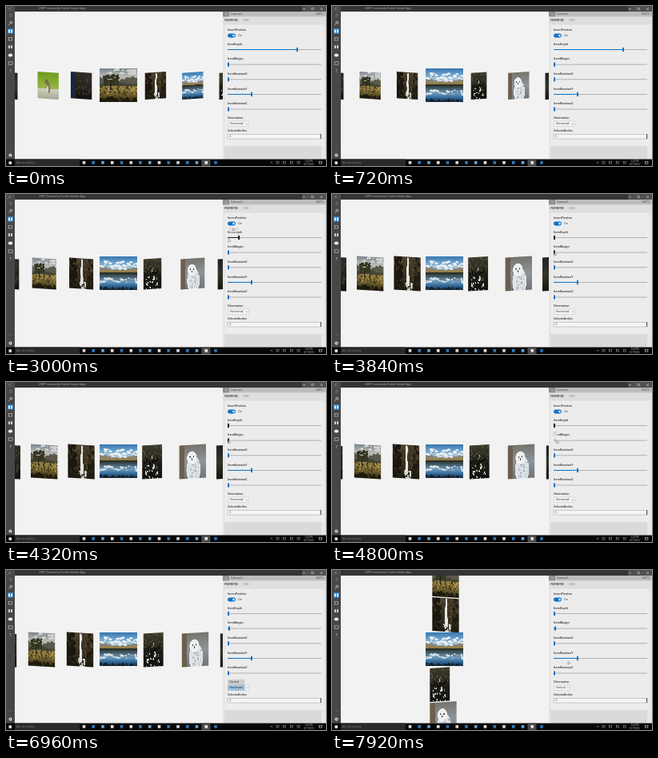
An HTML page with a canvas for the animation above (8 s loop, 400 by 200 pixels).

```html
<!DOCTYPE html>
<html lang="en">
<head>
<meta charset="utf-8">
<title>Carousel sample</title>
<style>
html, body { margin: 0; width: 100%; height: 100%; overflow: hidden; background: #f2f2f2; }
canvas { display: block; width: 400px; height: 200px; }
</style>
</head>
<body>
<canvas id="stage"></canvas>
<script>
const LOOP = 8000;
const BLUE = '#0f73c6';
const FONT = '"Open Sans", "Noto Sans", sans-serif';
const canvas = document.getElementById('stage');
const ratio = window.devicePixelRatio || 1;
canvas.width = 400 * ratio;
canvas.height = 200 * ratio;
const ctx = canvas.getContext('2d');

const clamp = v => Math.max(0, Math.min(1, v));
const mix = (a, b, p) => a + (b - a) * p;
function ease(t, from, to) {
  const p = clamp((t - from) / (to - from));
  return p * p * (3 - 2 * p);
}

function rect(x, y, w, h, color, c = ctx) {
  c.fillStyle = color;
  c.fillRect(x, y, w, h);
}
function frame(x, y, w, h, color, width = 0.6) {
  ctx.strokeStyle = color;
  ctx.lineWidth = width;
  ctx.strokeRect(x, y, w, h);
}
function disc(x, y, r, color, c = ctx, ry = r) {
  c.fillStyle = color;
  c.beginPath();
  c.ellipse(x, y, r, ry, 0, 0, 7);
  c.fill();
}
function pill(x, y, w, h, color) {
  ctx.fillStyle = color;
  ctx.beginPath();
  ctx.roundRect(x, y, w, h, Math.min(w, h) / 2);
  ctx.fill();
}
function line(x0, y0, x1, y1, color, width = 0.6) {
  ctx.strokeStyle = color;
  ctx.lineWidth = width;
  ctx.beginPath();
  ctx.moveTo(x0, y0);
  ctx.lineTo(x1, y1);
  ctx.stroke();
}
// Arrow head: (dx, dy) points from the tip along one arm.
function chevron(x, y, dx, dy, color, side = false) {
  line(x, y, x + dx, y + dy, color);
  line(x, y, side ? x + dx : x - dx, side ? y - dy : y + dy, color);
}
function text(str, x, y, size, color, weight = 400, align = 'left') {
  ctx.font = `${weight} ${size}px ${FONT}`;
  ctx.textAlign = align;
  ctx.textBaseline = 'middle';
  ctx.fillStyle = color;
  ctx.fillText(str, x, y);
}

// ---- pictures, painted once in a 47 x 42 space ----
const W = 47, H = 42;
function random(seed) {
  return () => (seed = (seed * 16807) % 2147483647) / 2147483647;
}
// Soft blotches inside a box between two heights.
function specks(c, n, x0, x1, y0, y1, color, r = 1.2, flat = 1) {
  const rnd = random(n * 97 + Math.round(x0 + y0 * 13) + 5);
  for (let i = 0; i < n; i++) {
    const size = r * (0.4 + rnd());
    disc(mix(x0, x1, rnd()), mix(y0, y1, rnd()), size, color, c, size * flat);
  }
}
function fade(c, y, h, ...colors) {
  const g = c.createLinearGradient(0, y, 0, y + h);
  colors.forEach((col, i) => g.addColorStop(i / (colors.length - 1), col));
  rect(0, y, W, h, g, c);
}
// Rolling land from a wavy crest down to the base line.
function hills(c, y, amp, base, color, phase = 0) {
  c.fillStyle = color;
  c.beginPath();
  c.moveTo(0, base);
  for (let x = 0; x <= W; x++) {
    c.lineTo(x, y - amp * (Math.sin(x / 7 + phase) + 0.35 * Math.sin(x * 0.9 + phase)));
  }
  c.lineTo(W, base);
  c.fill();
}
// Falling water: a wandering band that widens with depth.
function stream(c, x, y0, y1, w0, w1, sway, color) {
  for (let y = y0; y < y1; y += 0.25) {
    const p = (y - y0) / (y1 - y0), w = mix(w0, w1, p * p);
    rect(x + sway * Math.sin(y / 3.5) - w / 2, y, w, 0.4, color, c);
  }
}
function picture(w, paint, dx = 0) {
  const img = document.createElement('canvas');
  img.width = w * 4;
  img.height = H * 4;
  const c = img.getContext('2d');
  c.scale(4, 4);
  paint(c);
  return { img, w, dx };
}

const dusk = picture(W, c => fade(c, 0, H, '#1d2226', '#34342c', '#15140f'));
const squirrel = picture(W, c => {
  fade(c, 0, H, '#6f9c1e', '#8fb23c', '#b9c48e');
  fade(c, 26, 16, '#cdd1bf', '#a9a795');
  disc(24, 24, 4.5, '#8d7a63', c, 9);
  disc(20, 15, 4, '#7c6a55', c);
  disc(22, 27, 2.5, '#d6cfc2', c, 5);
}, 5);
const night = picture(W, c => {
  fade(c, 0, H, '#2d2b28', '#26231d', '#14120e');
  rect(0, 0, 11, H, '#18263f', c);
  specks(c, 50, 11, W, 3, 34, '#3a352a', 1.5);
  specks(c, 18, 18, 42, 8, 26, '#51483a', 0.9);
});
const valley = picture(W, c => {
  fade(c, 0, 20, '#7d868e', '#b9bbb8', '#9d9b90');
  specks(c, 14, 8, W, 1, 7, '#cfd0cc', 3, 0.5);
  hills(c, 13, 2.5, 26, '#5b594c', 2);
  hills(c, 18, 1.5, 27, '#454536', 5);
  fade(c, 22, 20, '#94803f', '#75632f', '#262212');
  specks(c, 70, 0, W, 22, 38, '#423b20', 1);
  specks(c, 24, 4, W, 23, 32, '#b59c58', 0.9);
  specks(c, 45, 5, 23, 8, 21, '#34351f', 1.7);
  rect(13, 16, 1.5, 11, '#25211a', c);
  specks(c, 30, 0, W, 37, H, '#1c190d', 2);
});
const falls = picture(W, c => {
  fade(c, 0, H, '#453d2c', '#39301f', '#1c1b12');
  specks(c, 90, 0, W, 2, 38, '#5d4f33', 1);
  specks(c, 70, 0, 14, 0, H, '#1b170f', 2.2);
  specks(c, 50, 36, W, 0, H, '#211c12', 1.8);
  stream(c, 24.5, 1, 36, 3.2, 6, 0.4, '#e6e7e3');
  specks(c, 26, 19, 32, 33, H, '#c9ccc6', 1.4);
});
const lake = picture(W, c => {
  fade(c, 0, 18, '#3878b2', '#78abd0', '#c8d7e1');
  specks(c, 34, 0, W, 6, 14, '#e6edf1', 2, 0.6);
  hills(c, 15, 1.6, 22, '#8b8376', 1);
  specks(c, 14, 12, 34, 13.5, 16, '#e8e6e2', 0.9);
  rect(0, 18, W, 2.5, '#94803f', c);
  fade(c, 20, 22, '#23281f', '#4a6170', '#6f9cbd', '#2f699a', '#173048');
  specks(c, 26, 0, W, 27, 33, '#d3dfe7', 1.7, 0.6);
  specks(c, 40, 0, W, 38.5, H, '#161f22', 1.2);
});
const creek = picture(35, c => {
  fade(c, 0, H, '#3b3a2c', '#232219', '#11110e');
  specks(c, 45, 0, 35, 0, 20, '#565039', 1);
  stream(c, 19, 12, 28, 1, 3, 2, '#c9cbc6');
  specks(c, 34, 5, 29, 25, H, '#dddfda', 1.1);
  specks(c, 40, 0, 35, 18, H, '#12110e', 1.6);
});
const owl = picture(W, c => {
  fade(c, 0, H, '#77736d', '#8c9499', '#6f7479');
  rect(0, 0, 9, H, '#6d5e4e', c);
  disc(25, 31, 12.5, '#dfe4e8', c, 17);
  disc(22, 16, 8.5, '#eef0f1', c, 8);
  specks(c, 55, 19, 36, 22, H, '#a3abb2', 0.7);
  [19, 25].forEach(x => disc(x, 15, 1, '#333028', c));
  disc(22, 18, 0.9, '#45413b', c, 1.3);
});
const items = [dusk, squirrel, night, valley, falls, lake, creek, owl, dusk];

function drawItem(item, k, scale, gap, vert) {
  const turn = Math.max(-1, Math.min(1, k));
  const amount = Math.abs(turn);
  const s = mix(1, scale, amount);
  const narrow = s * mix(1, 0.71, amount);
  const cx = 140.5 + mix(k * gap, -turn * 1.5, vert);
  const cy = 99.2 + k * 43.3 * vert + 0.3 * amount;
  const slope = -turn * 2.2 * s;
  ctx.save();
  ctx.translate(cx - W * narrow / 2 + item.dx * amount, cy - H * s / 2 - slope / 2);
  ctx.transform(narrow, slope / W, 0, s, 0, 0);
  ctx.drawImage(item.img, 0, 0, item.w, H);
  ctx.restore();
}

const steps = t => ease(t, 220, 460) + ease(t, 460, 700);

function drawCarousel(t) {
  const depth = (depthX(t - 240) - 278) / 86;
  const gap = 46.4 + 1.6 * ease(t, 4440, 4740);
  const vert = ease(t, 7320, 7700);
  ctx.save();
  ctx.beginPath();
  ctx.rect(11, 7, 260, 184.5);
  ctx.clip();
  items.forEach((item, i) => drawItem(item, i - 3 - steps(t), 1 - 0.21 * depth, gap, vert));
  ctx.restore();
}

// ---- window chrome ----
function drawChrome() {
  const ink = '#cfcfcf';
  rect(0, 0, 400, 200, '#f2f2f2');
  rect(0, 0, 400, 7, '#353535');
  rect(0, 0, 11, 7, '#4c4c4c');
  rect(370, 0, 30, 7, '#505050');
  rect(0, 7, 11, 185, '#474747');
  text('UWP Community Toolkit Sample App', 41, 3.6, 3.4, '#b0b0b0');
  chevron(4, 3.5, 1.4, 1.4, ink, true);
  line(371, 3.6, 374, 3.6, ink);
  frame(382, 2.2, 2.6, 2.6, ink, 0.5);
  line(393, 2.2, 396, 5, ink);
  line(393, 5, 396, 2.2, ink);

  for (let i = 0; i < 3; i++) line(4, 10 + i * 1.6, 8, 10 + i * 1.6, '#9a9a9a', 0.4);
  disc(6.3, 20.6, 1.8, ink);
  disc(6.3, 20.6, 1.1, '#474747');
  line(5, 22, 3, 24, ink);
  rect(1.8, 28, 7.6, 6.6, '#2f7fbf');
  for (let i = 0; i < 2; i++) {
    rect(3 + i * 3, 29.5, 2, 4, '#f0f0f0');
    rect(3 + i * 3, 49.2, 2, 3.8, ink);
  }
  frame(3.5, 39.5, 4, 3.5, ink);
  disc(5.5, 61.5, 2.7, '#f0f0f0', ctx, 2);
  frame(3.2, 69.8, 4.8, 3.4, ink);
  text('?', 5.5, 81.5, 4.5, ink, 600, 'center');
  text('…', 5.5, 176, 4, ink, 400, 'center');
  disc(5.5, 186.5, 2, '#e4e4e4');
  disc(5.5, 186.5, 0.8, '#474747');
}

function drawTaskbar() {
  const tints = ['#d8d8d8', '#2f7fc4', '#6ba7d2', '#e6e6e6', '#2a78b8'];
  rect(0, 191.5, 400, 8.5, '#050505');
  rect(3.5, 194.3, 3.5, 3.5, '#e8e8e8');
  rect(11, 191.5, 81, 8.5, '#292929');
  text('Ask me anything', 13, 196, 3, '#8c8c8c');
  rect(244.5, 191.5, 11, 8.5, '#4a4a4a');
  for (let i = 0; i < 15; i++) rect(95.7 + i * 11.75, 194, 3.6, 3.6, tints[i % 5]);
  chevron(332, 195, 1.4, 1.4, '#ccc');
  for (let i = 0; i < 4; i++) frame(338 + i * 8.7, 194.6, 3, 2.4, '#b4b4b4', 0.5);
  text('3:24 PM', 378.5, 194.2, 2.7, '#c8c8c8', 400, 'center');
  text('8/17/2016', 378.5, 197.9, 2.7, '#c8c8c8', 400, 'center');
  frame(391.5, 194.2, 3.4, 2.8, '#d8d8d8');
}

// ---- property panel ----
const depthX = t => 364 - 19 * ease(t, 2160, 2400) - 67 * ease(t, 2400, 3240);
const label = (str, y) => text(str, 277, y, 3.5, '#262626', 600);

function slider(name, y, x, color = BLUE) {
  label(name, y);
  rect(277, y + 6.4, 117, 0.8, '#a3a3a3');
  rect(277, y + 6.3, x - 277, 1, color);
  pill(x - 1, y + 4, 2, 5.6, color);
}
function tip(x, y, w, str) {
  rect(x - w / 2, y - 2.4, w, 4.8, '#e4e4e4');
  frame(x - w / 2, y - 2.4, w, 4.8, '#c4c4c4', 0.4);
  text(str, x, y, 3.2, '#444', 400, 'center');
}

function drawOrientation(t) {
  const vertical = t >= 7320;
  const w = vertical ? 20 : 26;
  label('Orientation', 140.5);
  rect(277.5, 144, w, 6.2, '#f4f4f4');
  frame(277.5, 144, w, 6.2, '#c2c2c2', 0.5);
  text(vertical ? 'Vertical' : 'Horizontal', 280, 147.2, 3.4, '#222');
  chevron(275 + w, 147.7, 1, -1, '#555');
  if (t < 6720 || vertical) return;
  rect(277, 136.8, 21.5, 14.2, '#cdcdcd');
  rect(277, 143.8, 21.5, 6.8, '#9cc3e2');
  text('Vertical', 279.5, 140.5, 3.4, '#222');
  text('Horizontal', 279.5, 147.2, 3.4, '#1b1b1b');
}

function drawPanel(t) {
  rect(271, 7, 129, 184.5, '#e6e6e6');
  rect(271, 7, 129, 6.5, '#bcbcbc');
  rect(271, 7, 8, 6.5, '#8c8c8c');
  chevron(274.5, 10.3, 1.4, 1.4, '#f4f4f4', true);
  text('Carousel', 281, 10.3, 3.4, '#3f3f3f');
  text('SAMPLE', 387, 10.3, 2.7, '#555');
  rect(271, 13.5, 129, 10, '#dedede');
  text('PROPERTIES', 273, 18.5, 2.9, '#222', 600);
  text('CODE', 296, 18.5, 2.9, '#7d7d7d');
  rect(274, 23.5, 123, 151.5, '#ececec');
  rect(273, 175, 121, 16.5, '#dadada');

  label('InvertPositive', 30);
  pill(277, 34.6, 10, 4.8, BLUE);
  disc(284.5, 37, 1.3, '#fff');
  text('On', 290, 37, 3.5, '#333');

  const x = depthX(t);
  const dragMargin = t > 4440 && t < 5160;
  const hoverMargin = t > 3720 && t <= 4440;
  slider('ItemDepth', 47.7, x, t > 2880 && t < 5160 ? '#161616' : BLUE);
  slider('ItemMargin', 66.3, 278 + ease(t, 4440, 4680),
    dragMargin ? '#c4c4c4' : hoverMargin ? '#161616' : BLUE);
  slider('ItemRotationX', 85, 278);
  slider('ItemRotationY', 103.6, 307);
  slider('ItemRotationZ', 122.2, 278);
  if (t > 2200 && t < 3480) tip(Math.max(282, x - 7), 45, 10, `${Math.round((x - 278) * 2.56)}`);
  if (dragMargin) tip(279, 65, 5, '1');

  label('SelectedIndex', 156.5);
  rect(277, 160.2, 117, 5.8, '#f5f5f5');
  frame(277, 160.2, 117, 5.8, '#9c9c9c', 0.5);
  line(393.5, 160, 393.5, 166, '#333', 0.8);
  text(String(4 + Math.round(steps(t))), 279.5, 163.2, 3.2, '#333');
  drawOrientation(t);
}

// The pointer leads the drag, then visits the margin slider, the list and the panel.
function drawCursor(t) {
  if (t < 1800) return;
  const x = mix(depthX(t + 330), 281, ease(t, 4300, 4680)) + 7 * ease(t, 5400, 6480)
    + 7 * ease(t, 7440, 7900);
  const y = 56 + 17 * ease(t, 3240, 3800) + 73 * ease(t, 5400, 6480)
    - 6 * ease(t, 6960, 7260) - 26 * ease(t, 7440, 7900);
  ctx.save();
  ctx.translate(x, y);
  ctx.beginPath();
  ctx.moveTo(0, 0);
  ctx.lineTo(0, 4.2);
  ctx.lineTo(1.2, 3.1);
  ctx.lineTo(3, 3);
  ctx.closePath();
  ctx.fillStyle = '#fff';
  ctx.fill();
  ctx.strokeStyle = '#333';
  ctx.lineWidth = 0.4;
  ctx.stroke();
  ctx.restore();
}

const start = performance.now();
function render(now) {
  const t = Math.max(0, now - start) % LOOP;
  ctx.setTransform(ratio, 0, 0, ratio, 0, 0);
  drawChrome();
  drawCarousel(t);
  drawPanel(t);
  drawTaskbar();
  drawCursor(t);
  requestAnimationFrame(render);
}
render(start);
</script>
</body>
</html>
```
